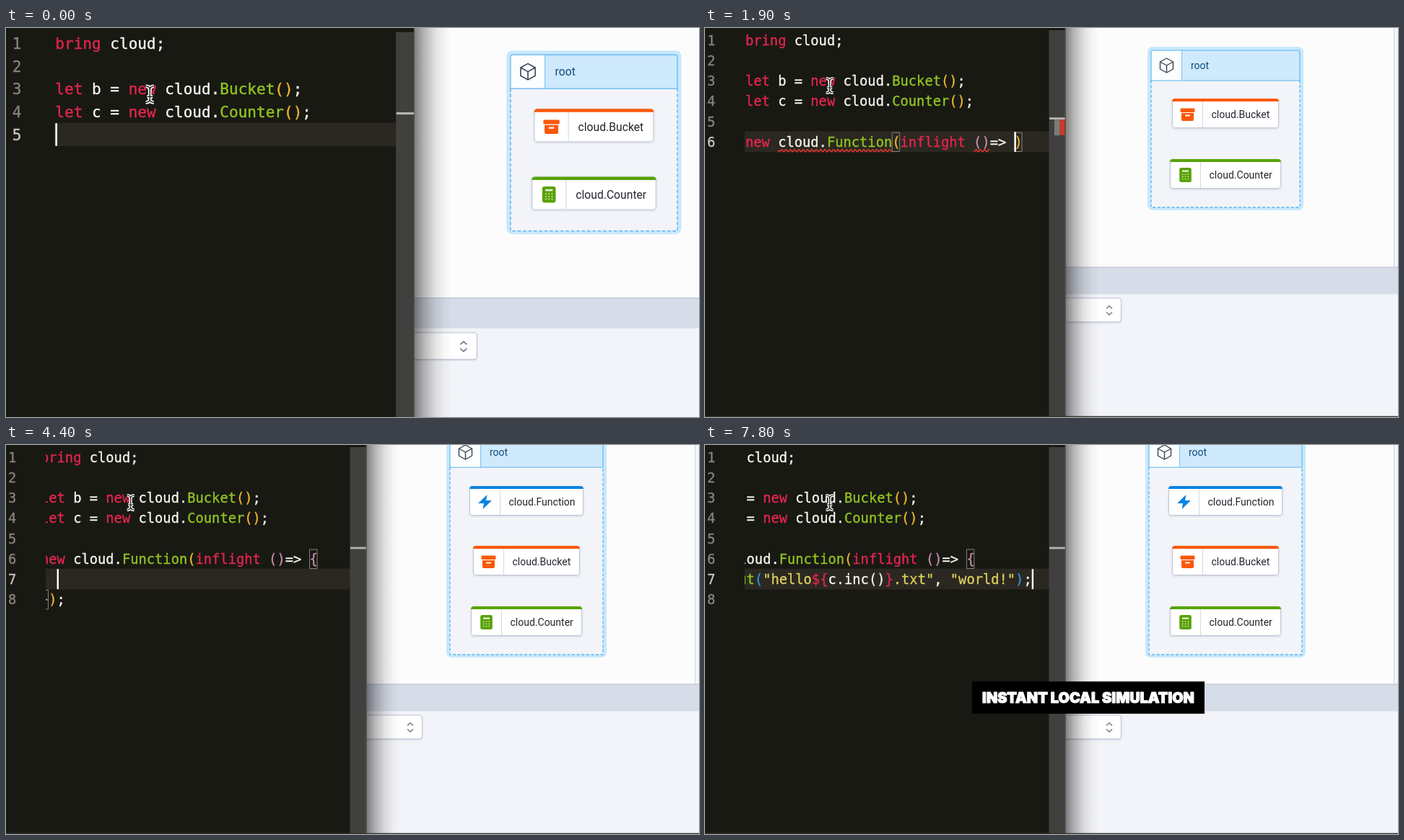
Animation, 960 px wide and 540 px high, one loop 8000 ms. Source, as an HTML page with a canvas:

```html
<!DOCTYPE html>
<html lang="en">
<head>
<meta charset="utf-8">
<title>Instant local simulation</title>
<style>
html, body { margin: 0; width: 100%; height: 100%; overflow: hidden; background: #191913; }
canvas { display: block; width: 960px; height: 540px; }
</style>
</head>
<body>
<canvas id="stage" width="960" height="540"></canvas>
<script>
const ctx = document.getElementById('stage').getContext('2d');
const LOOP = 8000, STEP = 100;
const CODE_X = 56, CHAR = 11.29, LINE = 28.2, FIRST = 17, CARET_MAX = 452.7;
const MONO = '18.75px "DejaVu Sans Mono", monospace';
const UI = '14px Roboto, sans-serif';
const SPLIT_AT = 4200;
const HEAD = ['bring cloud;', '', 'let b = new cloud.Bucket();', 'let c = new cloud.Counter();', ''];
const CALL = 'new cloud.Function(inflight ()=> {});';
const BODY = '  b.put("hello${c.inc()}.txt", "world!");';
const CALL_KEYS = [[150, 0], [700, 18], [800, 18], [1900, 33], [2000, 33], [2500, 37]];
const BODY_KEYS = [[4500, 2], [5100, 8], [5250, 8], [6600, 30], [7400, 41]];
const INK = { key: '#e3254f', name: '#92c521', text: '#f6f6f0', string: '#ded05f' };
const PAIRS = ['#edb62c', '#c58bb4', '#2c94dc'];

const clamp = v => Math.max(0, Math.min(1, v));
const smooth = v => { v = clamp(v); return v * v * (3 - 2 * v); };
const mix = (a, b, p) => a + (b - a) * p;
const lineY = n => FIRST + LINE * n;

function typed(keys, t) {
  let count = keys[0][1];
  for (let i = 1; i < keys.length; i++) {
    const [t0, n0] = keys[i - 1], [t1, n1] = keys[i];
    if (t >= t0) count = mix(n0, n1, clamp((t - t0) / (t1 - t0)));
  }
  return Math.floor(count + 1e-6);
}

// Closing characters the editor adds by itself after the caret.
function autoClose(text) {
  const open = [], close = { '(': ')', '{': '}' };
  for (const ch of text) {
    if (ch === '"') open[open.length - 1] === '"' ? open.pop() : open.push('"');
    else if (close[ch]) open.push(close[ch]);
    else if (ch === open[open.length - 1]) open.pop();
  }
  return open.reverse().join('');
}

function editorState(t) {
  if (t < 100) return { lines: HEAD, row: 4, col: 0 };
  if (t < SPLIT_AT) {
    const col = typed(CALL_KEYS, t), text = CALL.slice(0, col);
    return { lines: [...HEAD, text + autoClose(text)], row: 5, col };
  }
  const col = typed(BODY_KEYS, t), text = BODY.slice(0, col);
  return { lines: [...HEAD, CALL.slice(0, 34), text + autoClose(text), '});'], row: 6, col };
}

function rect(x, y, w, h, fill) {
  ctx.fillStyle = fill;
  ctx.fillRect(x, y, w, h);
}

function box(x, y, w, h, r, fill, stroke, width = 1) {
  ctx.beginPath();
  ctx.roundRect(x, y, w, h, r);
  if (fill) { ctx.fillStyle = fill; ctx.fill(); }
  if (stroke) { ctx.strokeStyle = stroke; ctx.lineWidth = width; ctx.stroke(); }
}

function line(points, color, width, closed) {
  ctx.beginPath();
  points.forEach(([x, y]) => ctx.lineTo(x, y));
  if (closed) ctx.closePath();
  ctx.strokeStyle = color;
  ctx.lineWidth = width;
  ctx.stroke();
}

// A thin outline in the same colour thickens the strokes of the type.
function text(str, x, y, font, color, { align = 'left', weight = 0 } = {}) {
  ctx.font = font;
  ctx.fillStyle = ctx.strokeStyle = color;
  ctx.textAlign = align;
  ctx.fillText(str, x, y);
  if (weight) {
    ctx.lineWidth = weight;
    ctx.strokeText(str, x, y);
  }
}

const code = (str, x, row, color) => text(str, x, lineY(row) + 6.8, MONO, color, { weight: 0.35 });

function squiggle(from, to, row) {
  const x0 = CODE_X + from * CHAR, x1 = CODE_X + to * CHAR, points = [];
  for (let x = x0; x <= x1; x++) points.push([x, lineY(row) + 12.3 + 1.6 * Math.sin(x * 1.05)]);
  line(points, '#e5352d', 1.5);
}

function drawCode({ lines, row, col }) {
  const stack = [];
  let scope = null;
  const frame = (r, c) => {
    ctx.strokeStyle = '#85857a';
    ctx.lineWidth = 1;
    ctx.strokeRect(CODE_X + c * CHAR, lineY(r) - 13, CHAR - 0.8, 26.5);
  };
  lines.forEach((source, r) => {
    let inString = false, inSlot = false, c = 0;
    for (const [token] of source.matchAll(/\w+|\s+|./g)) {
      if (r === row && c === col) scope = stack[stack.length - 1];
      let color = INK.text;
      if (inSlot) {
        if (token === '{' || token === '}') color = INK.key;
        if (token === '}') inSlot = false;
      } else if (token === '"') {
        inString = !inString;
        color = INK.string;
      } else if (inString) {
        inSlot = token === '$';
        color = inSlot ? INK.key : INK.string;
      } else if (/^(bring|let|new|inflight)$/.test(token)) color = INK.key;
      else if (/^([A-Z]\w*|put)$/.test(token)) color = INK.name;
      else if (token === '(' || token === '{') {
        color = PAIRS[stack.length % 3];
        stack.push({ r, c });
      } else if (token === ')' || token === '}') {
        const opener = stack.pop();
        color = PAIRS[stack.length % 3];
        if (opener && opener === scope) frame(r, c);
      }
      [...token].forEach((ch, i) => code(ch, CODE_X + (c + i) * CHAR, r, color));
      c += token.length;
    }
    if (r === row && c === col) scope = stack[stack.length - 1];
  });
  if (scope) frame(scope.r, scope.c);
}

function drawPointer(x, y) {
  const stroke = (color, width) => {
    ctx.beginPath();
    for (const dir of [-1, 1]) {
      ctx.moveTo(x - 5, y + dir * 10);
      ctx.quadraticCurveTo(x, y + dir * 10, x, y + dir * 6);
      ctx.quadraticCurveTo(x, y + dir * 10, x + 5, y + dir * 10);
    }
    ctx.moveTo(x, y - 7);
    ctx.lineTo(x, y + 7);
    ctx.moveTo(x - 3.5, y + 3);
    ctx.lineTo(x + 3.5, y + 3);
    ctx.strokeStyle = color;
    ctx.lineWidth = width;
    ctx.stroke();
  };
  stroke('#fff', 4.2);
  stroke('#111', 1.2);
}

function drawEditor(t) {
  const state = editorState(t), { row, col, lines } = state;
  const scroll = Math.max(t < SPLIT_AT ? 0 : 8, CODE_X + col * CHAR - CARET_MAX);
  const failing = (t >= 300 && t < 2600) || (t >= 4700 && t < 7400);

  rect(-10, -10, 509.5, 560, '#191913');
  rect(55, lineY(row) - 14.5, 444, 28.8, '#2b2821');
  lines.forEach((_, i) => code(i + 1, 3, i, i === row ? '#c9c9c3' : '#84857e'));

  ctx.save();
  ctx.beginPath();
  ctx.rect(55, 0, 422, 540);
  ctx.clip();
  ctx.translate(-scroll, 0);
  if (t >= 600 && t < 1000) {
    const glow = ctx.createLinearGradient(168, 0, 240, 0);
    glow.addColorStop(0, 'rgba(50,80,150,.35)');
    glow.addColorStop(1, 'rgba(50,80,150,0)');
    rect(168, lineY(5) - 14, 72, 28, glow);
  }
  drawCode(state);
  if (failing) {
    if (row === 5 && col > 4) squiggle(4, Math.min(18, col), 5);
    if (row === 5 && col > 29) squiggle(28, 30, 5);
    if (row === 6) squiggle(2, lines[6].length, 6);
  }
  rect(CODE_X + col * CHAR, lineY(row) - 14, 2.4, 28, '#fff');
  ctx.restore();

  rect(476.5, 3, 22.5, 540, '#40403e');
  const mark = row === 4 ? 103.6 : row === 5 ? 125.6 : 143;
  if (failing) {
    rect(484, mark, 7.5, 23.5, '#7c7a78');
    rect(491.5, mark + 1, 7, 22, '#cb3a27');
  }
  rect(477, mark - 1.4, 22, 2.8, '#b4b4b2');
  rect(498.6, -10, 1, 560, '#5d5b51');
  drawPointer(172.7, 80);
}

const icons = {
  bucket(x, y, color) {
    box(x - 10, y - 8.5, 20, 5.5, 1.5, color);
    box(x - 8.5, y - 2, 17, 11, [0, 0, 2, 2], color);
    box(x - 3.5, y + 0.6, 7, 2, 1, '#fff');
  },
  counter(x, y, color) {
    box(x - 8.3, y - 10, 16.6, 20, 2.5, color);
    rect(x - 4.5, y - 6.5, 9, 2.2, '#e9f3dd');
    for (let i = 0; i < 9; i++) rect(x - 4.5 + (i % 3) * 3.8, y - 1.5 + Math.floor(i / 3) * 3.2, 1.4, 1.4, '#e9f3dd');
  },
  bolt(x, y, color) {
    ctx.beginPath();
    [[3, -10], [-9.5, 2], [-1.5, 2], [-3, 10], [9.5, -2], [1.5, -2]].forEach(([dx, dy]) => ctx.lineTo(x + dx, y + dy));
    ctx.fillStyle = color;
    ctx.fill();
  },
  cube(x, y) {
    const ink = '#3b4252';
    line([[x, y - 10], [x + 9, y - 5], [x + 9, y + 5], [x, y + 10], [x - 9, y + 5], [x - 9, y - 5]], ink, 1.4, true);
    line([[x - 9, y - 5], [x, y], [x + 9, y - 5]], ink, 1.4);
    line([[x, y], [x, y + 10]], ink, 1.4);
  }
};

function card(cx, y, full, color, label, icon, grow = 1) {
  const w = full * grow, x = cx - w / 2;
  ctx.save();
  ctx.shadowColor = 'rgba(60,70,100,.22)';
  ctx.shadowBlur = 3;
  ctx.shadowOffsetY = 1;
  box(x, y, w, 41, 4, '#fff');
  ctx.restore();
  box(x + 0.5, y + 0.5, w - 1, 40, 4, null, '#c0c7d7');
  if (grow < 1) rect(x + w - 1, y + 4, full - w, 36, 'rgba(252,252,253,.9)');
  box(x, y, w, 4, [4, 4, 0, 0], color);
  rect(x + 42, y + 4, 1, 36, '#d3d8e3');
  icons[icon](x + 21.5, y + 22, color);
  text(label, x + 54.5, y + 27, UI, '#23262e');
}

function drawRoot(t) {
  const p = smooth((t - 3600) / 400), settle = Math.pow(p, 0.6);
  const half = mix(103, 106, p), x = 721 - half, w = half * 2;
  const top = mix(31, -11, p), bottom = mix(249, 291, p), blue = '#5ab5ee';
  box(x - 5, top - 5, w + 10, bottom - top + 9, 7, '#c8e8fc');
  rect(x, top, w, bottom - top, '#f2f4f9');
  ctx.setLineDash([4, 2.6]);
  line([[x, top + 42], [x, bottom], [x + w, bottom], [x + w, top + 42]], blue, 1.3);
  ctx.setLineDash([]);
  box(x, top, w, 42, [3, 3, 0, 0], '#cfe9fd');
  rect(x, top, 42, 42, '#fcfdfe');
  rect(x + 42, top, 1, 42, '#7cc4f2');
  box(x, top, w, 42, [3, 3, 0, 0], null, blue, 1.1);
  icons.cube(x + 21.5, top + 21);
  text('root', x + 55, top + 26, UI, '#0f4c7c');

  if (p > 0) card(721, top + 68, 158, '#0a84e2', 'cloud.Function', 'bolt', Math.pow(p, 0.78));
  card(721, mix(98, 140, settle), 148, '#fa5807', 'cloud.Bucket', 'bucket');
  card(721, mix(182, 224, settle), 154, '#58a205', 'cloud.Counter', 'counter');
}

function drawConsole(t) {
  rect(499, -10, 470, 560, '#fcfcfd');
  rect(954, -10, 20, 342, '#f3f4f9');
  rect(954, -10, 1, 342, '#cfd5e1');
  drawRoot(t);
  rect(499, 332, 470, 210, '#f3f4f9');
  rect(499, 332, 470, 37.5, '#d6dce8');
  rect(499, 331.5, 470, 1, '#b7c0d0');

  ctx.save();
  ctx.shadowColor = 'rgba(60,70,100,.25)';
  ctx.shadowBlur = 3;
  ctx.shadowOffsetY = 1;
  box(480, 375, 96.5, 33, 4, '#fff');
  ctx.restore();
  box(480, 375, 96.5, 33, 4, null, '#bcc4d3');
  for (const dir of [-1, 1]) {
    line([[556, 392 + dir * 2.5], [560, 392 + dir * 6.3], [564, 392 + dir * 2.5]], '#717d92', 1.5);
  }

  const shade = ctx.createLinearGradient(499, 0, 546, 0);
  [[0, 0.5], [0.25, 0.29], [0.55, 0.11], [0.8, 0.03], [1, 0]].forEach(([at, a]) => shade.addColorStop(at, `rgba(0,0,0,${a})`));
  rect(499, -10, 47, 560, shade);
}

function drawCaption() {
  rect(370, 328.3, 322, 44.7, '#000');
  text('INSTANT LOCAL SIMULATION', 531, 358.3, '900 19.9px Inter, sans-serif', '#fff', { align: 'center', weight: 1.1 });
}

function draw(t) {
  const p = smooth((t - 850) / 1050), scale = mix(1.122, 1, p);
  ctx.setTransform(scale, 0, 0, scale, mix(5.5, 0, p), mix(2.3, 0, p));
  ctx.lineJoin = 'round';
  ctx.lineCap = 'butt';
  drawConsole(t);
  drawEditor(t);
  rect(-10, 538.7, 980, 2, '#35352f');
  ctx.setTransform(1, 0, 0, 1, 0, 0);
  if (t >= 4600) drawCaption();
}

const start = performance.now();
function tick() {
  const t = (performance.now() - start) % LOOP;
  draw(Math.floor(t / STEP) * STEP);
  requestAnimationFrame(tick);
}
tick();
</script>
</body>
</html>
```
